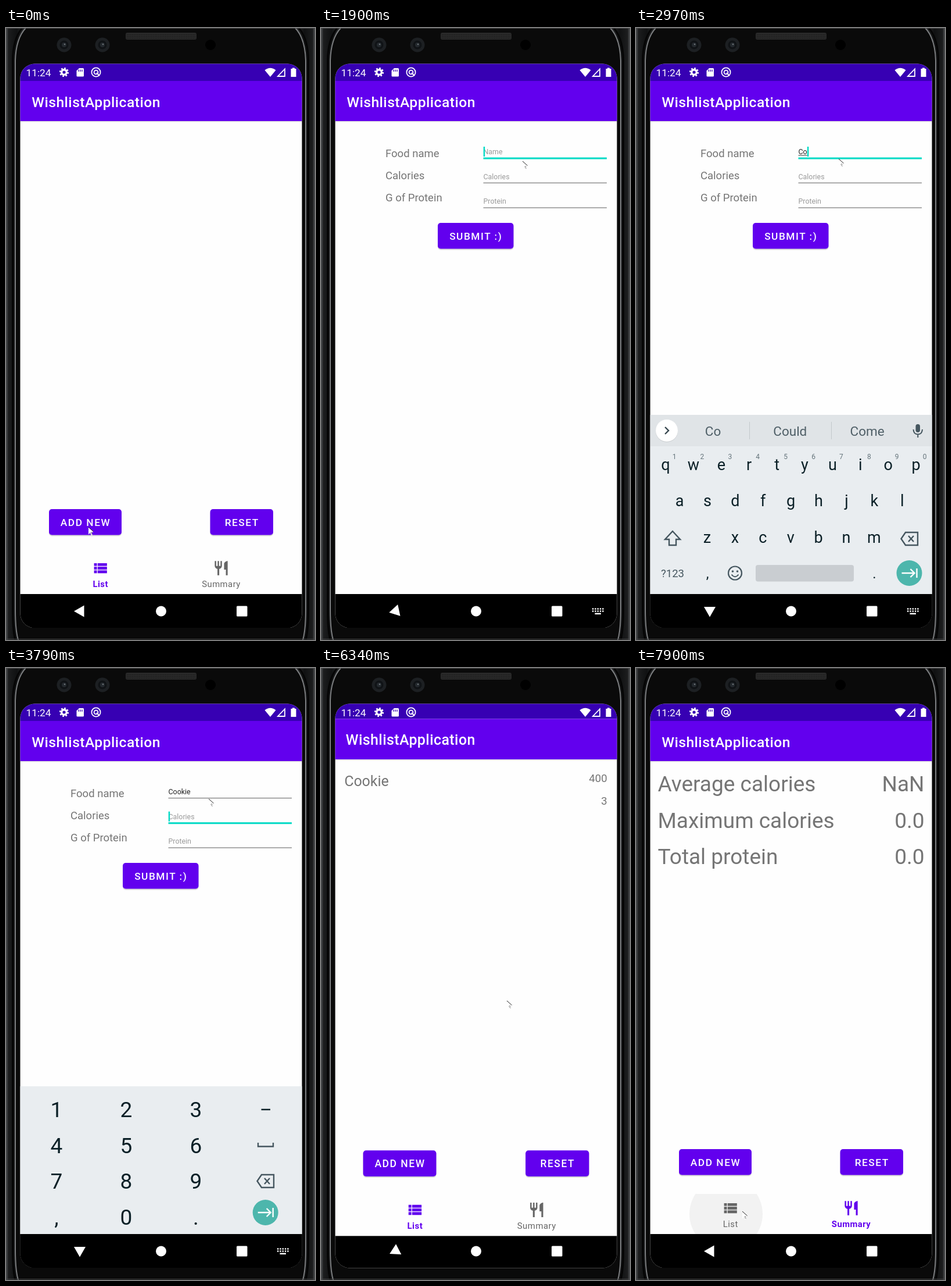
An HTML page for the animation above (8 s loop, 532 by 1052 pixels).

```html
<!DOCTYPE html>
<html lang="en">
<head>
<meta charset="utf-8">
<title>Wishlist demo</title>
<style>
html, body { margin: 0; width: 100%; height: 100%; overflow: hidden; background: #0a0a0a; }
svg { display: block; width: 532px; height: 1052px; font-family: Roboto, sans-serif; }
</style>
</head>
<body>
<svg id="stage" viewBox="0 0 532 1052">
  <defs>
    <clipPath id="screen"><rect x="24.5" y="61.5" width="485" height="970" rx="25"/></clipPath>
    <clipPath id="tabs"><rect x="24" y="904" width="486" height="69"/></clipPath>
    <linearGradient id="metal">
      <stop offset="0" stop-color="#3c3e40"/><stop offset=".15" stop-color="#1b1c1d"/>
      <stop offset=".55" stop-color="#101112"/><stop offset="1" stop-color="#28292a"/>
    </linearGradient>
    <g id="side" fill="none">
      <path d="M0 0H33Q16 18 15 56V1000Q15 1035 20 1052H0Z" fill="url(#metal)"/>
      <path d="M1.5 0V1052" stroke="#505254"/>
      <path d="M28 0Q12 18 11.500 56V1000Q11.500 1035 16 1052" stroke="#050505" stroke-width="3"/>
      <path d="M34 0Q17 18 16 56V1000Q16 1035 21 1052" stroke="#7c7e80" stroke-width="2"/>
    </g>
    <g id="camera">
      <circle r="12.5" fill="#1d2023"/><circle r="7.5" fill="#101316"/>
      <circle r="4" fill="#24292e"/><circle cx="1" cy="-1" r="1.3" fill="#6b7176"/>
    </g>
    <path id="listIcon" d="M3 14h4v-4H3zm0 5h4v-4H3zM3 9h4V5H3zm5 5h13v-4H8zm0 5h13v-4H8zM8 5v4h13V5z"/>
    <path id="foodIcon" d="M11 9H9V2H7v7H5V2H3v7c0 2.12 1.66 3.84 3.75 3.97V22h2.5v-9.03C11.34 12.84 13 11.12 13 9V2h-2zm5-3v8h2.5v8H21V2c-2.76 0-5 2.24-5 4z"/>
    <g id="erase" fill="none" stroke="#45565f" stroke-width="2.4">
      <path d="M-14.5 0L-7-11H14V11H-7ZM-2-5L7 5M7-5L-2 5"/>
    </g>
    <g id="enter">
      <circle r="22" fill="#4db6ac"/>
      <path d="M-13 0H8M2-7L9 0L2 7M13-8V8" fill="none" stroke="#fff" stroke-width="2.4"/>
    </g>
    <g id="pointer">
      <path d="M0 0V12.5L2.9 10L5 14.5L7 13.5L5.2 9L8.7 8.3Z" fill="#fff"/>
      <path d="M0 0L8.5 7.6" stroke="#222"/>
      <path d="M3 10L5.5 8.3L6 10L4.5 11.5L6.8 12.6" fill="none" stroke="#777" stroke-width=".8"/>
    </g>
  </defs>
  <rect width="532" height="1052" fill="#0a0a0a"/>
  <use href="#side"/>
  <use href="#side" transform="translate(532) scale(-1 1)"/>
  <path d="M0 .5H532M0 1050.5H532" stroke="#48494a"/>
  <rect x="206" y="8" width="122" height="12" rx="3" fill="#292929"/>
  <path d="M208 11.5H326M208 14.5H326M208 17.5H326" stroke="#171717" stroke-dasharray="1.5 1.5"/>
  <use href="#camera" x="100" y="29"/>
  <use href="#camera" x="166" y="29"/>
  <circle cx="352" cy="29" r="9" fill="#000"/>
  <g id="app" clip-path="url(#screen)"></g>
  <g fill="#fff">
    <text x="34.5" y="83" font-size="17.3">11:24</text>
    <g fill="none" stroke="#fff">
      <circle cx="100" cy="76" r="4.3" stroke-width="3.4"/>
      <circle cx="100" cy="76" r="6.6" stroke-width="3" stroke-dasharray="2.6 2.58"/>
      <circle cx="155" cy="76" r="7.6" stroke-width="1.8"/>
      <circle cx="155" cy="76" r="3.4" stroke-width="1.8"/>
      <path d="M156 77L161 82" stroke-width="2"/>
      <path d="M480 70.5V83H468Z" stroke-width="1.8"/>
    </g>
    <path d="M126 69H132.5Q134 69 134 70.5V82Q134 83.5 132.5 83.5H123Q121.5 83.5 121.5 82V73.5Z"/>
    <path d="M125 71.5V75M128 71.5V75M131 71.5V75" stroke="#3700b3" stroke-width="1.3"/>
    <path d="M455 84L445.5 72.5Q455 65 464.5 72.5Z"/>
    <path d="M490.5 70H493V68.5H497V70H499.5V84H490.5Z"/>
    <circle cx="267" cy="1002.5" r="9"/>
    <rect x="397" y="993.5" width="18.5" height="18" rx="1.5"/>
    <path id="back" d="M-10 0L7.5-10V10Z"/>
    <g id="ime" stroke="#fff" stroke-width="2.4">
      <path d="M467 998.5H487M467 1002.5H487" stroke-dasharray="2.4 1.9"/>
      <path d="M471.5 1006.8H482"/>
    </g>
  </g>
  <use id="mouse" href="#pointer"/>
</svg>
<script>
const LOOP = 8000, VIOLET = '#6200ee', TEAL = '#03dac5', GREY = '#757575', INK = '#0b2027';
const OPEN = 939, FOCUS = 1900, CLOSE = 6191, SUMMARY = 7180;
const TICKS = [0, 150, 550, 670, 820, 940, 1090, 1210, 1330, 1450, 1600, 1750, 1900, 2050, 2170, 2320,
  2690, 2970, 3090, 3240, 3360, 3510, 3790, 4320, 4500, 4690, 4970, 5240, 5680, 5830, 5950, 6070, 6220,
  6340, 6490, 6610, 6760, 6910, 7030, 7180, 7330, 7480, 7600, 7750, 7900];
const MOUSE = [[0, 142, 858], [150, 142, 855], [820, 142, 855], [1090, 357, 315], [1450, 350, 242],
  [1900, 347, 229], [2320, 349, 225], [5240, 349, 225], [5680, 329, 310], [5950, 290, 356],
  [6220, 295, 366], [6340, 320, 572], [6760, 368, 925], [7330, 368, 925], [7750, 148, 945], [7900, 183, 934]];
const FIELDS = [
  { label: 'Food name', hint: 'Name', text: 'Cookie', keys: [2690, 2970, 3090, 3240, 3360, 3510] },
  { label: 'Calories', hint: 'Calories', text: '400', keys: [4320, 4500, 4690] },
  { label: 'G of Protein', hint: 'Protein', text: '3', keys: [5240] }];
const GUESSES = ['', 'C Can Come', 'Co Could Come', 'Coo Cool Cook', 'Cook Cooking Cooked',
  'Cooki Cookies Cooking', 'Cookie Cookies Cooking'];

const byId = id => document.getElementById(id);
const clamp = v => Math.max(0, Math.min(1, v));
const smooth = v => (v = clamp(v)) * v * (3 - 2 * v);
const settle = v => 1 - (1 - clamp(v)) ** 4;
const pen = document.createElement('canvas').getContext('2d');

const rect = (x, y, w, h, fill, more = '') =>
  `<rect x="${x}" y="${y}" width="${w}" height="${h}" fill="${fill}" ${more}/>`;
const text = (x, y, str, size, fill, more = '') =>
  `<text x="${x}" y="${y}" font-size="${size}" fill="${fill}" ${more}>${str}</text>`;
const mid = (x, y, str, size, fill, more = '') => text(x, y, str, size, fill, 'text-anchor="middle" ' + more);
const end = (x, y, str, size, fill) => text(x, y, str, size, fill, 'text-anchor="end"');
const line = (d, color, width = 2.4) => `<path d="${d}" fill="none" stroke="${color}" stroke-width="${width}"/>`;
const dot = (x, y, r, fill, more = '') => `<circle cx="${x}" cy="${y}" r="${r}" fill="${fill}" ${more}/>`;
const put = (id, x, y) => `<use href="#${id}" x="${x}" y="${y}"/>`;

function button(x, y, w, label, pressed) {
  return rect(x, y + 2, w, 44.5, '#000', 'rx="5" opacity=".15"') + rect(x, y, w, 44.5, VIOLET, 'rx="5"') +
    (pressed ? rect(x, y, w, 44.5, '#fff', 'rx="5" opacity=".2"') : '') +
    mid(x + w / 2 + .5, y + 29, label, 17.3, '#fff', 'font-weight="500" letter-spacing="1.54"');
}

function screen(body, scale = 1, alpha = 1) {
  return `<g transform="translate(267 546) scale(${scale}) translate(-267 -546)" opacity="${alpha}">` +
    rect(24, 61, 486, 970, '#fefefe') + rect(24, 61, 486, 30, '#3700b3') +
    rect(24, 160, 486, 1.5, '#000', 'opacity=".12"') + rect(24, 91, 486, 69, VIOLET) +
    text(44.3, 135.5, 'WishlistApplication', 24.7, '#fff', 'font-weight="500" letter-spacing=".45"') +
    body + rect(24, 973, 486, 58, '#000') + '</g>';
}

function tab(x, label, icon, active) {
  const color = active ? VIOLET : '#666';
  return `<g transform="translate(${x - 14.8} 913.7) scale(1.235)" fill="${color}">${put(icon, 0, 0)}</g>` +
    mid(x, 960.5, label, 14.8, color, `letter-spacing=".5" font-weight="${active ? 700 : 400}"`);
}

function home(t) {
  const summary = t >= SUMMARY;
  let out = '';
  if (summary) {
    [['Average calories', 'NaN'], ['Maximum calories', '0.0'], ['Total protein', '0.0']].forEach(([a, b], i) => {
      const y = 212.3 + i * 62.5;
      out += text(37.5, y, a, 37, GREY) + end(496.5, y, b, 37, GREY);
    });
  } else if (t >= CLOSE) {
    out += text(42, 205.5, 'Cookie', 24.7, GREY) + end(491, 198.5, '400', 18.5, GREY) + end(491, 237.3, '3', 18.5, GREY);
  }
  const hover = t >= 7750 ? 155 : t >= 6760 && t < 7480 ? 370 : 0;
  if (hover) out += dot(hover, 938.5, 63, '#f2f2f2', 'clip-path="url(#tabs)"');
  return out + button(74, 827, 125, 'ADD NEW', t >= 550 && t < OPEN) + button(351.5, 827, 108.5, 'RESET') +
    tab(162.7, 'List', 'listIcon', !summary) + tab(370.5, 'Summary', 'foodIcon', summary);
}

const typed = (field, t) => field.text.slice(0, field.keys.filter(k => t >= k).length);

function form(t) {
  const focus = t < FOCUS ? -1 : t < 3790 ? 0 : t < 4970 ? 1 : 2;
  pen.font = '12.4px Roboto, sans-serif';
  let out = '';
  FIELDS.forEach((field, i) => {
    const y = 217 + i * 42.7, value = typed(field, t), on = focus === i;
    const w = pen.measureText(value).width;
    out += text(111, 222.3 + i * 37.8, field.label, 18.5, GREY) +
      text(279.5, y, value || field.hint, 12.4, value ? '#222' : '#9a9a9a') +
      (on ? rect(279.5, y + 5.5, 212.5, 3, TEAL) : rect(279.5, y + 6, 212.5, 1.2, '#777'));
    if (on && !i) out += rect(279.5, y + 1.5, w, 1, '#333');
    if (on) out += rect(279.7 + w, y - 13, 2.5, 17, TEAL);
  });
  return out + button(201, 335, 130.5, 'SUBMIT :)', t >= 6070);
}

function letters(t) {
  const guess = GUESSES[typed(FIELDS[0], t).length], icon = '#45565f';
  const row = (keys, x, y) => [...keys].map((k, i) => mid(x + i * 47.9, y, k, 27, INK)).join('');
  let out = rect(24, 665, 486, 54, '#e0e4e7') + rect(24, 719, 486, 254, '#e9edf0') +
    dot(53, 693, 19, '#000', 'opacity=".1"') + dot(53, 692, 19, '#fff') +
    line(guess ? 'M50 686L56 692L50 698' : 'M56 686L50 692L56 698', '#37474f');
  if (guess) {
    out += guess.split(' ').map((w, i) => mid(132.5 + i * 132.8, 701, w, 22.5, '#4f5f67')).join('') +
      line('M195.5 677V707M336.5 677V707', '#c3c9cc', 1);
  }
  out += rect(481.5, 681, 7.5, 14, icon, 'rx="3.7"') + line('M477.5 690Q478 698.5 485.3 698.5T493 690M485.3 698V704', icon, 2) +
    row('qwertyuiop', 51, 760) + row('asdfghjkl', 75, 822) + row('zxcvbnm', 122.5, 885);
  for (let i = 0; i < 10; i++) out += mid(66 + i * 47.9, 741, (i + 1) % 10, 12, '#65747b');
  return out + line('M63 865L76 879H69V889H57V879H50Z', icon) + put('erase', 471, 878) +
    mid(63, 944, '?123', 18.5, icon) + mid(123, 946, ',', 24, INK) + mid(410.5, 946, '.', 24, INK) +
    dot(170.5, 937, 11.5, 'none', `stroke="${icon}" stroke-width="2.2"`) +
    dot(166.5, 934, 1.8, icon) + dot(174.5, 934, 1.8, icon) + line('M164.5 939.5Q170.5 947 176.5 939.5', icon, 2) +
    rect(206, 923, 169, 28.5, '#c9cdd1', 'rx="4"') + put('enter', 470.5, 937);
}

function digits() {
  return rect(24, 719, 486, 254, '#e9edf0') +
    [...'123456789,0.'].map((k, i) => mid(87 + i % 3 * 120, 772 + Math.floor(i / 3) * 61.7, k, 37, INK)).join('') +
    line('M439.5 759H455', INK, 2.6) + line('M434 816V822.5H460V816', '#45565f') +
    put('erase', 447, 882) + put('enter', 446.7, 936);
}

function keyboard(t) {
  if (t < 2050 || t >= 6340) return '';
  const drop = 1 - smooth((t - 2020) / 250) + smooth((t - 6120) / 200);
  return `<g transform="translate(0 ${drop * 308})">${t < 3790 ? letters(t) : digits()}</g>` +
    rect(24, 973, 486, 58, '#000');
}

function scene(t) {
  const opened = settle((t - OPEN) / 400), closed = settle((t - CLOSE) / 400);
  if (t < OPEN) return screen(home(t));
  if (t < CLOSE) {
    const behind = opened < 1
      ? screen(home(0), 1 + .05 * opened) + rect(24, 61, 486, 970, '#000', `opacity="${.2 * opened}"`) : '';
    return behind + screen(form(t), .85 + .15 * opened, clamp((t - OPEN - 35) / 50)) + keyboard(t);
  }
  const leaving = clamp(1 - 3 * closed);
  return screen(home(t), 1.05 - .05 * closed) +
    (leaving ? screen(form(t), 1 - .1 * closed, leaving) : '') + keyboard(t);
}

function mouseAt(t) {
  const next = MOUSE.findIndex(k => k[0] > t);
  if (next < 0) return MOUSE[MOUSE.length - 1].slice(1);
  const a = MOUSE[next - 1], b = MOUSE[next], u = (t - a[0]) / (b[0] - a[0]);
  return [1, 2].map(i => a[i] + (b[i] - a[i]) * u);
}

let shown = -1;
function frame() {
  const now = performance.now() % LOOP;
  const t = TICKS.filter(k => k <= now).pop();
  if (t !== shown) {
    shown = t;
    byId('app').innerHTML = scene(t);
    const turn = 90 * (smooth((t - 6150) / 300) - smooth((t - 1830) / 300));
    byId('back').setAttribute('transform', `translate(127 1002.5) rotate(${turn})`);
    byId('ime').setAttribute('opacity', t >= FOCUS && t < 6340 ? 1 : 0);
    byId('mouse').setAttribute('transform', `translate(${mouseAt(t)})`);
  }
  requestAnimationFrame(frame);
}
frame();
</script>
</body>
</html>
```
